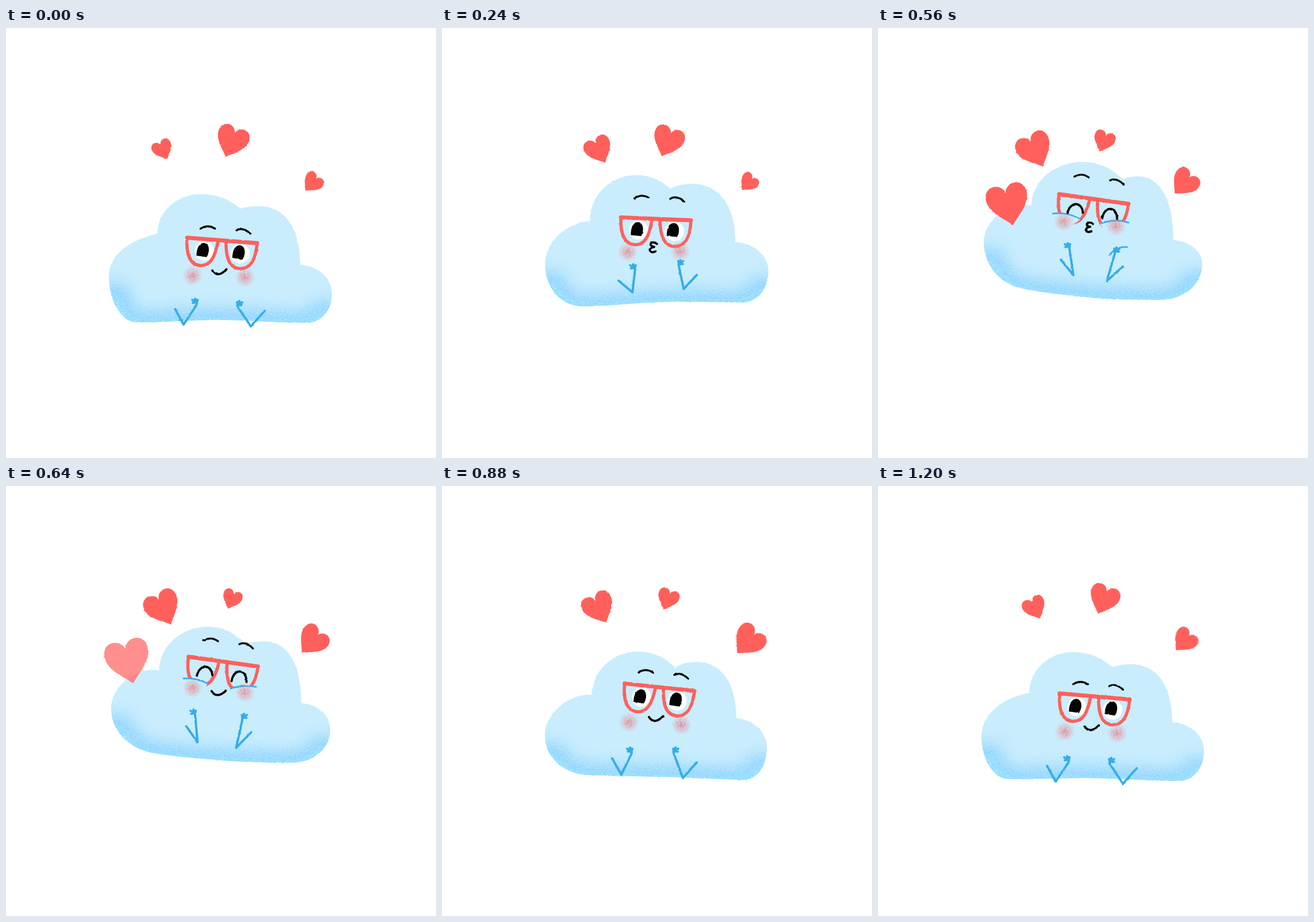
An HTML page that plays this animation: 748 by 748 pixels, repeating every 1280 ms.

```html
<!DOCTYPE html>
<html lang="en">
<head>
<meta charset="utf-8">
<title>Cloud sending kisses</title>
<style>
html, body { margin: 0; width: 100%; height: 100%; overflow: hidden; background: #fff; }
svg { display: block; width: 100%; height: 100%; }
.ink, .blue, .red { fill: none; stroke-linecap: round; stroke-linejoin: round; }
.ink { stroke: #050505; stroke-width: 3.8; }
.blue { stroke: #35ade6; stroke-width: 4; }
.red { stroke: #ff605c; stroke-width: 5.6; }
.thin { stroke-width: 2.8; }
.sky { fill: #c9edfd; }
</style>
</head>
<body>
<svg viewBox="0 0 748 748">
  <defs>
    <filter id="rough" filterUnits="userSpaceOnUse" x="0" y="0" width="748" height="748" color-interpolation-filters="sRGB">
      <feTurbulence type="fractalNoise" baseFrequency=".2" numOctaves="2" seed="4"/>
      <feDisplacementMap in="SourceGraphic" scale="2.4" xChannelSelector="R" yChannelSelector="G"/>
    </filter>
    <filter id="grain" filterUnits="userSpaceOnUse" x="0" y="0" width="748" height="748" color-interpolation-filters="sRGB">
      <feGaussianBlur in="SourceGraphic" stdDeviation="14" result="soft"/>
      <feTurbulence type="fractalNoise" baseFrequency=".55" numOctaves="2" seed="9"/>
      <feColorMatrix values="0 0 0 0 1  0 0 0 0 1  0 0 0 0 1  4 0 0 0 -1.5"/>
      <feComposite in2="soft" operator="arithmetic" k1=".75" k3=".5"/>
    </filter>
    <filter id="speckle" x="-10%" y="-10%" width="120%" height="120%" color-interpolation-filters="sRGB">
      <feTurbulence type="fractalNoise" baseFrequency=".6" numOctaves="2" seed="2"/>
      <feColorMatrix values="0 0 0 0 1  0 0 0 0 1  0 0 0 0 1  6 0 0 0 -2.5"/>
      <feComposite in2="SourceGraphic" operator="arithmetic" k1=".8" k3=".3"/>
    </filter>
    <radialGradient id="pink">
      <stop offset="0" stop-color="#f0656b" stop-opacity=".85"/>
      <stop offset=".45" stop-color="#f0757b" stop-opacity=".5"/>
      <stop offset="1" stop-color="#f0858b" stop-opacity="0"/>
    </radialGradient>
    <clipPath id="inside"><path id="edge"/></clipPath>
    <path id="heart" d="M0 30C-8 20-27.500 8-27.500-9C-27.500-29-4-29 0-14C4-29 27.500-29 27.500-9C27.500 8 8 20 0 30Z" fill="#ff605c"/>
    <path id="pupil" d="M-10.500 11C-11.500-4-6-12 1-12C8-12 11-5 10.300 3Q10 8 7.500 12Z" fill="#050505"/>
  </defs>
  <g filter="url(#rough)">
    <path id="body" class="sky"/>
    <g clip-path="url(#inside)">
      <g filter="url(#grain)">
        <path id="shade" transform="translate(0 14)" fill="none" stroke="#8ad2fe" stroke-width="66"/>
      </g>
    </g>
    <g id="face">
      <g id="open">
        <ellipse cx="-29.500" cy="21" rx="16.500" ry="17" fill="#fff"/>
        <ellipse cx="33" cy="21" rx="17" ry="17" fill="#fff"/>
        <use href="#pupil" x="-32" y="19.500"/>
        <use href="#pupil" x="30.500" y="18.500"/>
      </g>
      <path class="red" d="M-61 1C-61 30-52 47-35 47C-17 47-10 30-7 3M7 3C9 30 16 47 34 47C52 47 61 30 61 1"/>
      <path class="red" style="stroke-width:7" d="M-61 .5H61"/>
      <g id="shut">
        <path class="ink" d="M-42 31C-40 9-19 8-15.500 27M19 32C20 8 42 7 45 30"/>
        <path id="cheekFill" class="sky"/>
        <path id="cheekLine" class="blue thin"/>
      </g>
      <g id="blush">
        <circle cx="-46.500" r="18" fill="url(#pink)" filter="url(#speckle)"/>
        <circle cx="44.500" cy="-5" r="18" fill="url(#pink)" filter="url(#speckle)"/>
      </g>
      <path id="brows" class="ink" style="stroke-width:3.4" d="M-39 2Q-27-7-14 0M23.500 0Q34-7 48 4"/>
      <path id="smile" class="ink" d="M-13 54Q-2 67 11.500 50"/>
    </g>
    <path id="kiss" class="ink" vector-effect="non-scaling-stroke" d="M14-11C4-21-11-16-8-8C-6-3 0-2 4-1C-8 0-14 7-10 13C-6 19 2 18 8 15"/>
    <path id="arms" class="blue"/>
    <path id="swish" class="blue thin"/>
    <use id="left" href="#heart"/>
    <use id="middle" href="#heart"/>
    <use id="right" href="#heart"/>
    <use id="blown" href="#heart"/>
  </g>
</svg>
<script>
const STEP = 80, COUNT = 16;
const KEYS = [0, 2, 5, 7, 9, 11, 15];
const $ = id => document.getElementById(id);
const set = (id, name, value) => $(id).setAttribute(name, value);
const show = (id, on) => set(id, 'visibility', on ? 'visible' : 'hidden');

// Outline points, clockwise from the notch on the left: x track, y track
const OUTLINE = [
  [[263, 252, 271, 267, 266, 261, 263], [358, 345, 318, 309, 339, 363, 360]],
  [[338, 334, 350, 355, 346, 340, 338], [289, 266, 240, 233, 264, 288, 289]],
  [[408, 396, 407, 426, 406, 406, 408], [314, 287, 269, 263, 292, 316, 315]],
  [[440, 432, 446, 452, 447, 442, 440], [310, 278, 262, 258, 288, 306, 310]],
  [[512, 510, 512, 514, 514, 512, 512], [412, 375, 370, 369, 391, 404, 411]],
  [[567, 569, 564, 564, 564, 565, 567], [462, 430, 412, 410, 440, 455, 460]],
  [[522, 525, 515, 490, 510, 525, 524], [513, 482, 473, 473, 494, 511, 513]],
  [[350, 370, 360, 360, 380, 390, 350], [508, 484, 469, 468, 490, 506, 508]],
  [[228, 240, 245, 250, 265, 255, 228], [512, 497, 459, 453, 483, 503, 510]],
  [[179, 179, 181, 184, 181, 179, 180], [432, 422, 386, 371, 409, 435, 436]]
];
const SHOULDER_LIFT = [9, 6, -5, -9, -5, -2, 7];

// Shoulder, elbow, wrist of each arm
const LEFT_ARM = [
  [[294, 303, 314, 318, 306, 296, 294], [489, 457, 411, 403, 441, 474, 487]],
  [[309, 327, 337, 340, 323, 312, 309], [516, 477, 435, 430, 470, 502, 514]],
  [[332, 337, 332, 333, 325, 330, 332], [481, 440, 392, 384, 424, 465, 480]]
];
const RIGHT_ARM = [
  [[450, 447, 433, 426, 428, 443, 450], [492, 443, 415, 415, 450, 481, 491]],
  [[426, 425, 405, 398, 405, 419, 426], [519, 468, 438, 440, 478, 508, 518]],
  [[403, 410, 414, 412, 410, 403, 403], [485, 431, 393, 392, 430, 465, 483]]
];

const FACE = [[376, 371, 375.5, 375.5, 380.5, 378.5, 377], [369, 345, 307.5, 297, 319.5, 349.5, 365.5]];
const TILT = [4.5, 1, 7, 8, 8, 6, 5];
const BROW = [-19, -32, -39.5, -35.5, -31, -23.5, -19.5];
const BLUSH = [65.8, 63, 51.7, 46.3, 61.5, 66.5, 65.8];
const CHEEK = [50, 50, 41, 37, 45.5, 50, 50];
const CHEEK_WIDTH = [16, 16, 20.5, 24.5, 18, 16, 16];

const HEARTS = [
  ['left', 272.5, 211, -26, [.64, .8, .99, 1.11, 1.11, 1, .73]],
  ['middle', 393, 196, 21, [1.02, 1.02, .82, .68, .59, .68, .95]],
  ['right', 533.5, 268.7, 42, [.64, .56, .73, .87, 1, 1, .77]]
];
// Flight of the blown heart, one entry per step
const FLIGHT = {
  start: 4,
  x: [315, 276, 248, 226, 212, 203, 200],
  y: [334, 319, 310, 304.5, 302.5, 301.6, 301],
  size: [.7, 1.05, 1.2, 1.32, 1.4, 1.45, 1.46],
  alpha: [1, 1, 1, 1, .7, .35, .12]
};
const KISS = { start: 3, x: [-3, -8, -11.3, -6, -1.2], size: [.5, .85, 1, .75, .48] };

// Smooth periodic curve through the key poses without overshoot
function at(track, u) {
  const n = KEYS.length;
  const time = i => KEYS[(i + n) % n] + COUNT * Math.floor(i / n);
  const value = i => track[(i + n) % n];
  const slope = i => (value(i + 1) - value(i)) / (time(i + 1) - time(i));
  const tangent = i => {
    const a = slope(i - 1), b = slope(i);
    return a * b <= 0 ? 0 : 2 * a * b / (a + b);
  };
  let i = n - 1;
  while (KEYS[i] > u) i--;
  const span = time(i + 1) - time(i), t = (u - time(i)) / span, r = 1 - t;
  return r * r * (1 + 2 * t) * value(i) + t * t * (3 - 2 * t) * value(i + 1)
    + span * t * r * (r * tangent(i) - t * tangent(i + 1));
}
const point = ([x, y], u) => [at(x, u), at(y, u)];

function curve(a, b, ax, ay, bx, by) {
  const r = v => v.toFixed(2);
  return `C${r(a[0] + ax)} ${r(a[1] + ay)} ${r(b[0] + bx)} ${r(b[1] + by)} ${r(b[0])} ${r(b[1])}`;
}

function drawCloud(u) {
  const p = OUTLINE.map(track => point(track, u));
  const d = p.map((a, i) => {
    const b = p[(i + 1) % p.length];
    return [b[0] - a[0], b[1] - a[1]];
  });
  const link = (i, ...handles) => curve(p[i], p[(i + 1) % p.length], ...handles);
  const lean = Math.max(0, d[7][1] / d[7][0]) * 1.6;
  const top = link(0, 1, .58 * d[0][1], -.53 * d[0][0], 0)
    + link(1, .45 * d[1][0], 0, -.28 * d[1][0], -.6 * d[1][1])
    + link(2, 9, d[2][1] * .7, -12, 0)
    + link(3, .65 * d[3][0], 0, 0, -.6 * d[3][1])
    + link(4, .6 * d[4][0], 2, 0, -.5 * d[4][1]);
  const base = link(5, 0, .6 * d[5][1], -.55 * d[5][0], 0)
    + link(6, .3 * d[6][0], 0, -.3 * d[6][0], -.3 * d[7][1])
    + link(7, .35 * d[7][0], .3 * d[7][1], -.35 * d[7][0], -.35 * d[7][0] * lean)
    + link(8, .6 * d[8][0], .6 * d[8][0] * lean, 0, -.5 * d[8][1]);
  const side = link(9, 0, .55 * d[9][1], -.5 * d[9][0], at(SHOULDER_LIFT, u));
  const whole = `M${p[0]}${top}${base}${side}Z`;
  set('body', 'd', whole);
  set('edge', 'd', whole);
  set('shade', 'd', `M${p[5]}${base}`);
}

function drawFace(u) {
  const [x, y] = point(FACE, u), tilt = at(TILT, u);
  const place = `translate(${x} ${y}) rotate(${tilt})`;
  const shut = u >= 4 && u <= 9;
  set('face', 'transform', place);
  set('brows', 'transform', `translate(0 ${at(BROW, u)})`);
  set('blush', 'transform', `translate(0 ${at(BLUSH, u)})`);
  show('open', !shut);
  show('shut', shut);

  const cy = at(CHEEK, u), w = at(CHEEK_WIDTH, u), bulge = (w - 15) * .9;
  const cheek = (cx, drop) => {
    const from = `${cx - w} ${cy - drop}`;
    const line = `M${from}Q${cx} ${cy - bulge} ${cx + w} ${cy + drop}`;
    return [line, `${line}Q${cx} ${cy + 32} ${from}Z`];
  };
  const a = cheek(-42.5, 1.5), b = cheek(41, -4.5);
  set('cheekLine', 'd', a[0] + b[0]);
  set('cheekFill', 'd', a[1] + b[1]);

  const k = u - KISS.start, kissing = k >= 0 && k < KISS.x.length;
  show('smile', !kissing);
  show('kiss', kissing);
  if (kissing) set('kiss', 'transform', `${place} translate(${KISS.x[k]} 50) rotate(${-tilt}) scale(${KISS.size[k]})`);
}

function drawArms(u) {
  const arm = (tracks, side) => {
    const [shoulder, elbow, wrist] = tracks.map(track => point(track, u));
    const finger = (...v) => 'M' + [wrist[0], wrist[1] - 4] + `l${v[0] * side} ${v[1]}`;
    return `M${shoulder}L${elbow}L${wrist}v-4` + finger(-8, -4) + finger(-7, 1) + finger(-3, -6) + finger(1, -4);
  };
  set('arms', 'd', arm(LEFT_ARM, 1) + arm(RIGHT_ARM, -1));
  const [x, y] = point(RIGHT_ARM[2], u);
  set('swish', 'd', `M${x - 9} ${y + 3}q10 -15 30 -14`);
  show('swish', u >= 5 && u <= 7);
}

function drawHearts(u) {
  const put = (id, x, y, turn, size) =>
    set(id, 'transform', `translate(${x} ${y}) rotate(${turn}) scale(${size})`);
  for (const [id, x, y, turn, size] of HEARTS) put(id, x, y, turn, at(size, u));
  const k = u - FLIGHT.start, flying = k >= 0 && k < FLIGHT.x.length;
  show('blown', flying);
  if (flying) {
    put('blown', FLIGHT.x[k], FLIGHT.y[k], -13, FLIGHT.size[k]);
    set('blown', 'opacity', FLIGHT.alpha[k]);
  }
}

let last = -1;
function tick() {
  const step = Math.floor(performance.now() / STEP) % COUNT;
  if (step !== last) {
    last = step;
    drawCloud(step);
    drawFace(step);
    drawArms(step);
    drawHearts(step);
  }
  requestAnimationFrame(tick);
}
tick();
</script>
</body>
</html>
```
